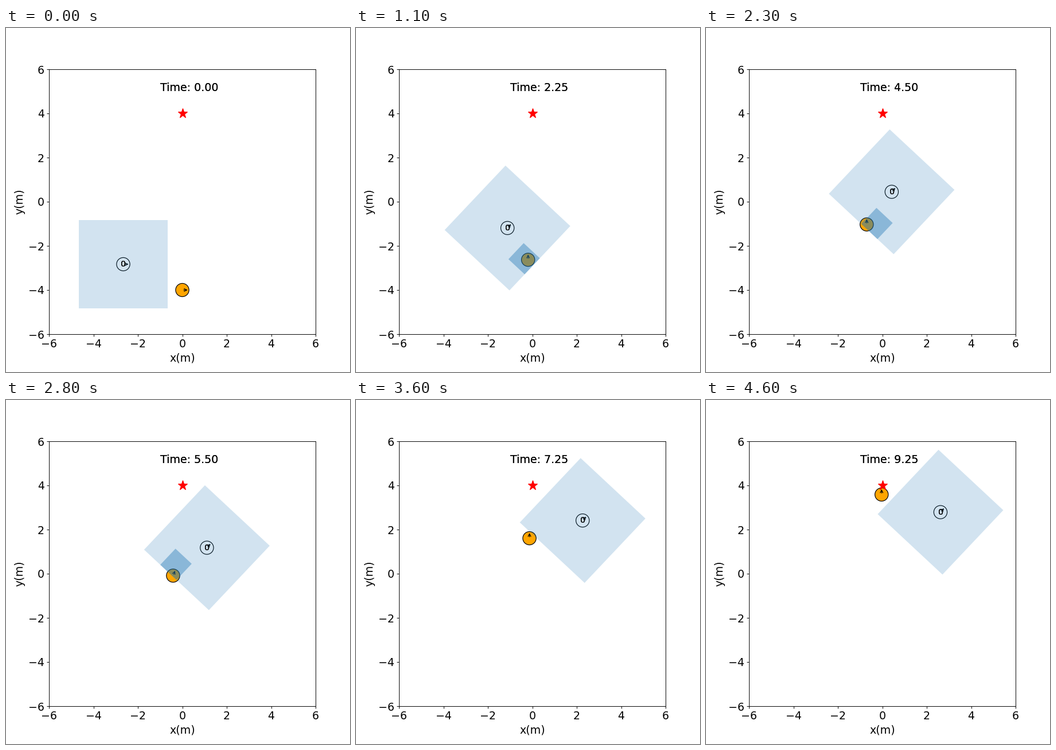
A matplotlib script for the animation above (4.8 s loop, 600 by 600 pixels).

```python
import numpy as np
import matplotlib.pyplot as plt
from matplotlib.animation import FuncAnimation
from matplotlib.patches import ArrowStyle, Circle, FancyArrowPatch, Polygon

S = 6 / 7  # point sizes are designed for a 7 inch figure
DT = 0.25
STEPS = 37
FRAMES = 48
RADIUS = 0.3
HALF = 2  # half width of the occupancy grid, in cells

# robot actions: heading in 1/16 turns, speed level 0-5, repeats
PLAN = [(4, 5, 2), (5, 5, 2), (4, 1, 1), (1, 1, 1), (5, 2, 1), (4, 3, 1),
        (4, 4, 4), (0, 1, 1), (5, 5, 1), (6, 5, 2), (5, 5, 1), (4, 5, 2),
        (3, 5, 4), (4, 5, 1), (3, 5, 1), (4, 5, 1), (3, 5, 1), (4, 5, 3),
        (3, 5, 1), (4, 5, 6)]

plt.rcParams.update({
    "font.family": "DejaVu Sans",
    "font.size": 16 * S,
    "axes.linewidth": 0.8 * S,
    "axes.labelpad": 4 * S,
    "patch.linewidth": S,
    "lines.markeredgewidth": S,
    **{f"{a}tick.major.{k}": v * S for a in "xy"
       for k, v in (("size", 3.5), ("pad", 3.5), ("width", 0.8))},
})


def unit(angle):
    return np.array([np.cos(angle), np.sin(angle)])


def rotation(angle):
    c, s = np.cos(angle), np.sin(angle)
    return np.array([[c, -s], [s, c]])


def robot_path():
    pos, heading = [np.array([0.0, -4.0])], [0.0]
    for turn, level, count in PLAN:
        speed = np.expm1(level / 5) / np.expm1(1)
        for _ in range(count):
            heading.append(turn * np.pi / 8)
            pos.append(pos[-1] + DT * speed * unit(heading[-1]))
    return pos, heading


def human_path():
    """Walk straight to the opposite point, easing in over the last metre."""
    start = np.array([-2.658, -2.831])
    pos, goal = [start], -start
    for _ in range(STEPS):
        gap = goal - pos[-1]
        pos.append(pos[-1] + DT * gap / max(1, np.hypot(*gap)))
    angle = np.arctan2(*(goal - start)[::-1])
    return pos, [0.0] + [angle] * STEPS


def square(center, size, angle):
    corners = size / 2 * np.array([[-1, -1], [1, -1], [1, 1], [-1, 1]])
    return center + corners @ rotation(angle).T


robot_pos, robot_dir = robot_path()
human_pos, human_dir = human_path()

fig, ax = plt.subplots(figsize=(6, 6), dpi=100)
ax.set(xlim=(-6, 6), ylim=(-6, 6), xlabel="x(m)", ylabel="y(m)",
       xticks=range(-6, 7, 2), yticks=range(-6, 7, 2))


def arrow():
    return ax.add_patch(FancyArrowPatch(
        (0, 0), (1, 0), color="black", mutation_scale=S, lw=S,
        shrinkA=2 * S, shrinkB=2 * S,
        arrowstyle=ArrowStyle("->", head_length=4, head_width=2)))


def shade(alpha):
    return ax.add_patch(Polygon(square(np.zeros(2), 1, 0), fc="tab:blue",
                                ec="none", lw=0, alpha=alpha))


def label(size):
    # two stacked copies give the heavier antialiasing
    return [ax.text(-1, 5, "", fontsize=size * S) for _ in range(2)]


ax.plot([0], [4], "*", color="red", markersize=15 * S)
robot = ax.add_patch(Circle((0, 0), RADIUS, fc="orange", ec="black"))
human = ax.add_patch(Circle((0, 0), RADIUS, fill=False, ec="black"))
robot_arrow, human_arrow = arrow(), arrow()
grid, cell = shade(0.2), shade(0.4)
clock, tag = label(16), label(12)
for t in tag:
    t.set_text("0")


def update(frame):
    step = frame - (frame + 3) // 5  # every fifth tick is held
    r, h = robot_pos[step], human_pos[step]
    angle = human_dir[step]

    robot.center, human.center = r, h
    robot_arrow.set_positions(r, r + RADIUS * unit(robot_dir[step]))
    human_arrow.set_positions(h, h + RADIUS * unit(angle))
    grid.set_xy(square(h, 2 * HALF, angle))

    # the cell of the human's grid that holds the robot
    index = np.floor(rotation(-angle) @ (r - h) + 0.02)
    cell.set_visible(bool(np.all((index >= -HALF) & (index < HALF))))
    cell.set_xy(square(h + rotation(angle) @ (index + 0.5), 1, angle))

    for t in clock:
        t.set_text(f"Time: {step * DT:.2f}")
    for t in tag:
        t.set_position(h - 0.11)
    return robot, human, robot_arrow, human_arrow, grid, cell, *clock, *tag


anim = FuncAnimation(fig, update, frames=FRAMES, interval=100,
                     repeat=True, repeat_delay=0, blit=False)
plt.show()
```
